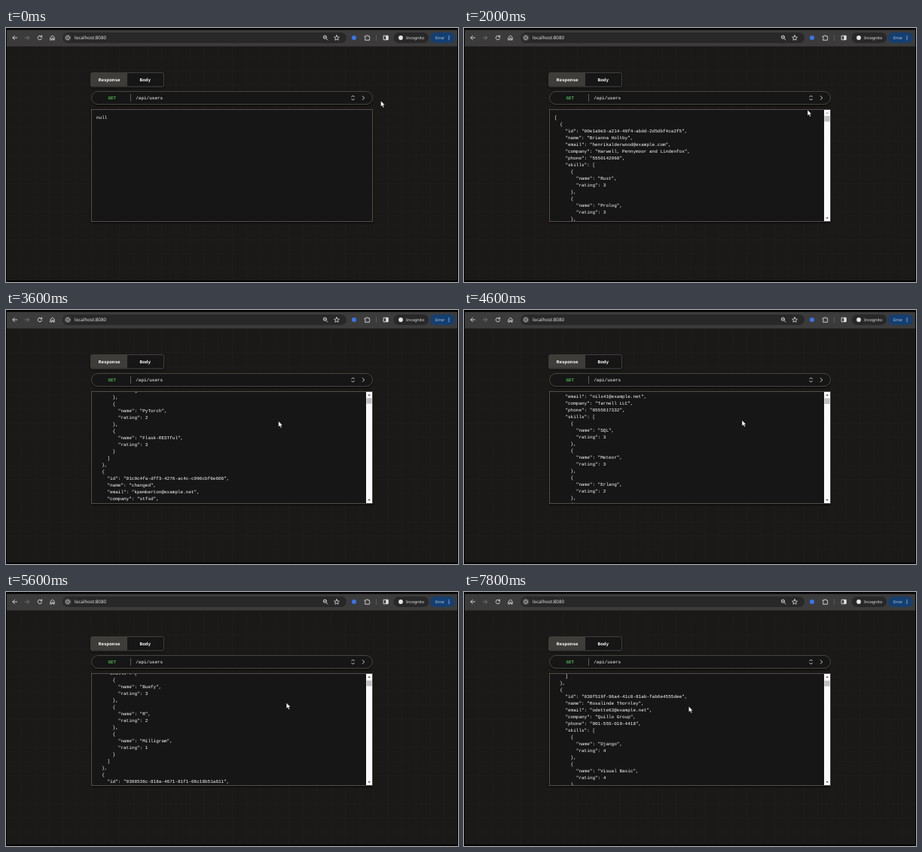
An HTML page that plays this animation: 600x338 px, repeating every 8 s.

```html
<!DOCTYPE html>
<html lang="en">
<head>
<meta charset="utf-8">
<title>API response viewer</title>
<style>
  html, body { margin: 0; width: 100%; height: 100%; overflow: hidden; background: #000; }
  svg { display: block; width: 100vw; height: 100vh; }
  text { text-rendering: geometricPrecision; fill: #fff; }
  .mono { font: 6px "Liberation Mono", "Courier New", monospace; }
  .bold { font-weight: 700; }
  .mid { text-anchor: middle; }
  .ui { font-family: "Noto Sans", "Open Sans", sans-serif; fill: #e6e6e6; }
  .icon { fill: none; stroke: #e0e0e0; stroke-width: .9; stroke-linecap: round; stroke-linejoin: round; }
</style>
</head>
<body>
<svg viewBox="0 0 600 338" preserveAspectRatio="none">
  <defs>
    <pattern id="grid" width="18.75" height="18.75" patternUnits="userSpaceOnUse">
      <path d="M0 .5H18.75M.5 0V18.75" stroke="#fff" stroke-opacity=".012"/>
    </pattern>
    <filter id="shadow" x="-10%" y="-20%" width="120%" height="150%">
      <feDropShadow dx="0" dy="1.5" stdDeviation="1.5" flood-color="#000" flood-opacity=".6"/>
    </filter>
    <clipPath id="view"><rect x="114" y="109" width="372" height="148"/></clipPath>
  </defs>

  <rect width="600" height="338" fill="#000"/>
  <rect x="1" y="24" width="598" height="312" fill="#1a1917"/>
  <rect x="1" y="24" width="598" height="312" fill="url(#grid)"/>

  <!-- browser toolbar -->
  <rect x="1" y="2.5" width="598" height="22" fill="#3b3b3b"/>
  <rect x="75" y="6" width="377" height="14" rx="7" fill="#282828"/>
  <g class="icon">
    <path d="M14.5 13H9M11.4 10.4 8.8 13l2.6 2.6"/>
    <path d="M25.2 13h5.5M28.2 10.4l2.6 2.6-2.6 2.6" stroke="#777"/>
    <path d="M47.2 11.4A2.7 2.7 0 1 0 47.6 13.8M47.6 10v1.9h-1.9"/>
    <path d="M59.2 12.4 61.7 10.2 64.2 12.4V16H62.6V13.8H60.8V16H59.2Z"/>
    <circle cx="82" cy="13" r="5" fill="#3b3b3b" stroke="none"/>
    <circle cx="82" cy="13" r="2.6" stroke-width=".7"/>
    <path d="M82 12.9v1.2M82 11.7v.1" stroke-width=".7"/>
    <circle cx="423.4" cy="12.2" r="2.1"/>
    <path d="M425 13.9 427 16M422.6 12.2h1.6" stroke-width=".8"/>
    <path d="M439 9.7 440 12 442.4 12.2 440.6 13.8 441.1 16.2 439 14.9 436.9 16.2 437.4 13.8 435.6 12.2 438 12Z" stroke-width=".8"/>
    <path d="M476.6 10.9H478.4A1.1 1.1 0 0 1 480.6 10.9H482.4V12.6A1 1 0 0 1 482.4 14.4V16.2H476.6V14.5A1 1 0 0 0 476.6 12.6Z"/>
    <path d="M491.5 9.5v7" stroke="#686868" stroke-width=".7"/>
    <rect x="501.5" y="10.3" width="5.6" height="5.4"/>
    <path d="M505 10.5h2v5h-2z" fill="#e0e0e0"/>
  </g>
  <circle cx="462" cy="13" r="3" fill="#3a74e8"/>
  <rect x="514.5" y="6" width="46.5" height="14" rx="7" fill="#282828"/>
  <circle cx="524" cy="13" r="2.9" fill="#e6e6e6"/>
  <rect x="563" y="6" width="33" height="14" rx="7" fill="#153f70"/>
  <g fill="#c8e1ff">
    <circle cx="588" cy="10.8" r=".65"/><circle cx="588" cy="13" r=".65"/><circle cx="588" cy="15.2" r=".65"/>
  </g>
  <text class="ui" x="91" y="15.2" font-size="6.2">localhost:8080</text>
  <text class="ui" x="531" y="15" font-size="5.4">Incognito</text>
  <text class="ui" x="570" y="15" font-size="5.1" style="fill:#c8e1ff">Error</text>

  <!-- tabs -->
  <rect x="112.5" y="59.5" width="97" height="18.5" rx="2" fill="#191816" stroke="#4b4a48" stroke-width=".8" filter="url(#shadow)"/>
  <path d="M161 60V77.6H114.4A1.5 1.5 0 0 1 112.9 76.1V61.5A1.5 1.5 0 0 1 114.4 60Z" fill="#3e3d3a"/>
  <text class="mono bold mid" x="137.2" y="70.6">Response</text>
  <text class="mono bold mid" x="184.8" y="70.6">Body</text>

  <!-- address row -->
  <rect x="113.5" y="84.5" width="373" height="17" rx="8.5" fill="#191816" stroke="#4f4e4b" stroke-width=".8" filter="url(#shadow)"/>
  <text class="mono bold mid" x="140.8" y="94.8" style="fill:#4caf50">GET</text>
  <path d="M165.5 88v10" stroke="#62615e" stroke-width=".9"/>
  <text class="mono" x="172.2" y="94.8">/api/users</text>
  <path class="icon" d="M458.9 91.6 460.6 89.9 462.3 91.6M458.9 94.4 460.6 96.1 462.3 94.4M473.3 90.6 475.7 93 473.3 95.4"/>

  <!-- response -->
  <rect x="113.5" y="108.5" width="373" height="149" fill="#181715" stroke="#5c5b58" stroke-width=".8" filter="url(#shadow)"/>
  <g clip-path="url(#view)">
    <text id="empty" class="mono" x="120" y="120.6">null</text>
    <g id="json"></g>
    <g id="bar">
      <rect x="478" y="109" width="8" height="148" fill="#fafafa"/>
      <rect id="thumb" x="478.4" width="7.2" height="7.6" fill="#c1c1c1"/>
      <path id="up" d="M480.3 114.1h3.6l-1.8-2.1z"/>
      <path d="M480.3 252h3.6l-1.8 2.1z" fill="#505050"/>
    </g>
  </g>
  <path id="cursor" d="M0 0V7.6L1.8 6 3.1 8.9 4.4 8.3 3.2 5.5H5.5Z" fill="#fff" stroke="#000" stroke-width=".4"/>
</svg>

<script>
const LOOP = 8000, STEP = 200, LOADED = 1000;
const LINE = 9, CHAR = 3.6;
const $ = id => document.getElementById(id);

const user = (id, name, email, company, phone, skills) => ({
  id, name, email, company, phone,
  skills: skills.split(", ").map(s => {
    const [, label, rating] = s.match(/(.+) (\d)$/);
    return { name: label, rating: +rating };
  })
});

const users = [
  user("00e1a9e3-a214-49f4-abdd-2d5dbf4ca2f5", "Brianna Holtby", "henrikalderwood@example.com",
    "Harwell, Pennymoor and Lindenfox", "5550142968",
    "Rust 3, Prolog 3, Elixir 2, PyTorch 2, Flask-RESTful 3"),
  user("01c0c4fa-dff3-4276-ac4c-c996cbf6e608", "changed", "kpemberton@example.net",
    "stfsd", "5550178240", "Lua 2, Haskell 4"),
  user("0257b1de-63a8-4d0c-9e47-b18f02c6a735", "Corwin Ashdell", "nils41@example.net",
    "Tarnell LLC", "0555017332", "SQL 3, Meteor 3, Erlang 2, Perl 1"),
  user("02c94e70-1fb5-4b92-8a36-e50d7c31f9a8", "Maribel Fenwick", "tansy19@example.org",
    "Ostrell Inc", "5550126071", "Buefy 3, R 2, Milligram 1"),
  user("0308536c-818a-4671-81f1-06c18b51a611", "Jorin Wexcombe", "pvale@example.com",
    "Dunmarle PLC", "5550193385", "Scala 2"),
  user("038f519f-96a4-41c0-81ab-fab6e4555dee", "Rosalinde Thornley", "odette63@example.net",
    "Quillo Group", "001-555-010-4418", "Django 4, Visual Basic 4, Buefy 1, Dart 2"),
  {}
];

JSON.stringify(users, null, 2).split("\n").forEach((line, i) => {
  const text = document.createElementNS("http://www.w3.org/2000/svg", "text");
  const body = line.trimStart();
  text.setAttribute("class", "mono");
  text.setAttribute("x", 120 + CHAR * (line.length - body.length));
  text.setAttribute("y", 120.6 + LINE * i);
  text.textContent = body;
  $("json").append(text);
});

// Each key: time, then values
const scrollKeys = [[2800, 0], [3600, 173.5], [4600, 453.5], [5600, 712.5], [6400, 1036.5], [7400, 942.5]];
const cursorKeys = [
  [0, 497.5, 97], [400, 476, 97], [1600, 476, 97], [1800, 472, 100], [2000, 456, 109],
  [2400, 366, 136], [2600, 343, 139], [2800, 346, 139], [3600, 361.7, 148],
  [4600, 369, 146.7], [5600, 372.2, 147.5], [6400, 371.2, 148.4],
  [7400, 366, 154], [7600, 347, 158], [7800, 298.3, 152.2]
];

function sample(keys, t) {
  const next = keys.findIndex(k => k[0] > t);
  if (next < 0) return keys[keys.length - 1].slice(1);
  if (next === 0) return keys[0].slice(1);
  const a = keys[next - 1], b = keys[next];
  const p = (t - a[0]) / (b[0] - a[0]);
  return a.slice(1).map((v, i) => v + (b[i + 1] - v) * p);
}

function draw(t) {
  const loaded = t >= LOADED;
  const [scroll] = sample(scrollKeys, t);
  const [x, y] = sample(cursorKeys, t);
  $("empty").style.display = loaded ? "none" : "";
  $("json").style.display = $("bar").style.display = loaded ? "" : "none";
  $("json").setAttribute("transform", `translate(0 ${-scroll})`);
  $("thumb").setAttribute("y", 117 + scroll * .001);
  $("up").setAttribute("fill", scroll > 0 ? "#505050" : "#a3a3a3");
  $("cursor").setAttribute("transform", `translate(${x} ${y})`);
}

const start = performance.now();
function tick() {
  const t = (performance.now() - start) % LOOP;
  draw(Math.floor(t / STEP) * STEP);
  requestAnimationFrame(tick);
}
tick();
</script>
</body>
</html>
```
